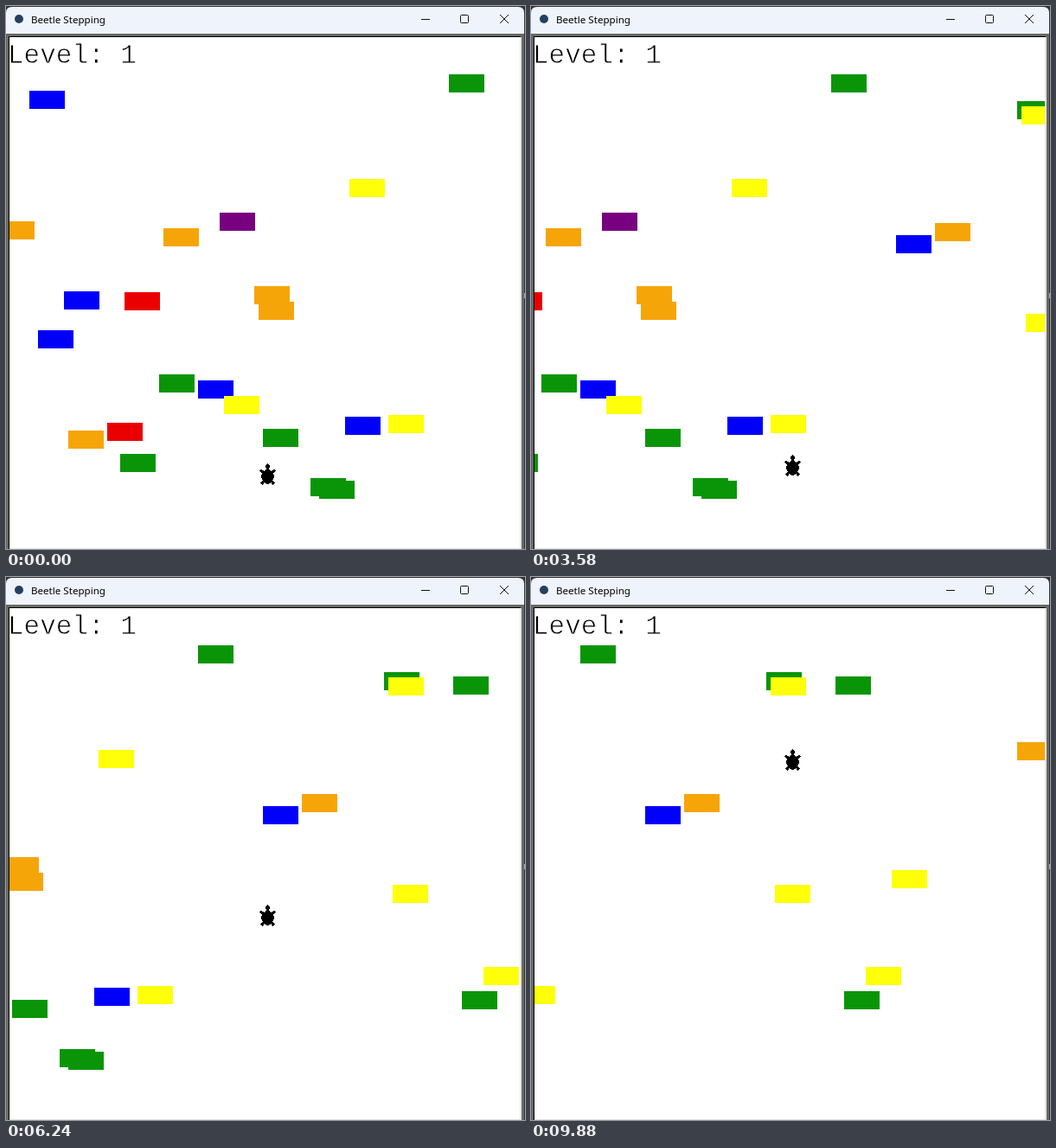
Write an HTML page that moves like this. It is 600 px wide and 628 px high and loops after 10000 ms.

```html
<!DOCTYPE html>
<html lang="en">
<head>
<meta charset="utf-8">
<title>Beetle Stepping</title>
<style>
  html, body { margin: 0; width: 100%; height: 100%; overflow: hidden; background: #fff; }
  svg { display: block; width: 600px; height: 628px; }
  .caption { font: 11.6px "Segoe UI", "Open Sans", "Noto Sans", sans-serif; }
  /* The white edge thins the strokes of the letters */
  .level { font: 31px "Courier New", "Liberation Mono", monospace; stroke: #fff; stroke-width: .8px; }
  .buttons { fill: none; stroke: #111; }
  .crisp { shape-rendering: crispEdges; }
  #cars rect { width: 41px; height: 21px; }
  .green { fill: #099507; }
  .blue { fill: #0000fa; }
  .orange { fill: #f6a509; }
  .red { fill: #eb0000; }
  .purple { fill: #780080; }
  .yellow { fill: #ffff0a; }
</style>
</head>
<body>
<svg viewBox="0 0 600 628">
  <defs>
    <clipPath id="field"><rect x="4" y="36" width="590" height="590"/></clipPath>
  </defs>

  <g class="crisp">
    <rect width="600" height="628" fill="#333"/>
    <rect x="599" y="332" width="1" height="6" fill="#aaa"/>
    <rect y="32" width="599" height="596" fill="#686866"/>
    <rect x="3" y="35" width="592" height="593"/>
    <rect x="4" y="36" width="592" height="592" fill="#e3e3e3"/>
    <rect x="4" y="36" width="590" height="591" fill="#fff"/>
  </g>
  <path d="M0 32V8Q0 1 7 1H592Q599 1 599 8V32Z" fill="#eff3fb"/>
  <circle cx="15" cy="15" r="5" fill="#24405f"/>
  <text class="caption" x="29" y="20">Beetle Stepping</text>
  <g class="buttons">
    <path d="M480 15.5H490"/>
    <rect x="525.5" y="10.5" width="9" height="9" rx="1"/>
    <path d="M571 10L581 20M581 10L571 20"/>
  </g>
  <text class="level" x="2" y="66">Level: 1</text>

  <g clip-path="url(#field)">
    <path id="turtle" class="crisp" stroke="#000" stroke-linejoin="round"
      d="M0-16L2-14 1-10 4-7 7-9 9-8 6-5 7-1 5 3 8 6 6 8 4 5 0 7-4 5-6 8-8 6-5 3-7-1-6-5-9-8-7-9-4-7-1-10-2-14Z"/>
    <g id="cars" class="crisp">
      <rect class="green" x="512" y="79"/>
      <rect class="blue" x="27" y="98"/>
      <rect class="yellow" x="397" y="200"/>
      <rect class="purple" x="247" y="239"/>
      <rect class="orange" x="-8" y="249"/>
      <rect class="orange" x="182" y="257"/>
      <rect class="orange" x="287" y="324"/>
      <rect class="blue" x="67" y="330"/>
      <rect class="red" x="137" y="331"/>
      <rect class="orange" x="292" y="342"/>
      <rect class="blue" x="37" y="375"/>
      <rect class="green" x="177" y="426"/>
      <rect class="blue" x="222" y="433"/>
      <rect class="yellow" x="252" y="451"/>
      <rect class="yellow" x="442" y="473"/>
      <rect class="blue" x="392" y="475"/>
      <rect class="red" x="117" y="482"/>
      <rect class="green" x="297" y="489"/>
      <rect class="orange" x="72" y="491"/>
      <rect class="green" x="132" y="518"/>
      <rect class="green" x="352" y="546"/>
      <rect class="green" x="362" y="549"/>
      <!-- Cars that drive in later -->
      <rect class="blue" x="587" y="265"/>
      <rect class="orange" x="632" y="251"/>
      <rect class="green" x="727" y="110"/>
      <rect class="yellow" x="732" y="116"/>
      <rect class="yellow" x="737" y="356"/>
      <rect class="green" x="807" y="115"/>
      <rect class="green" x="817" y="479"/>
      <rect class="yellow" x="842" y="451"/>
      <rect class="yellow" x="872" y="339"/>
      <rect class="orange" x="1017" y="191"/>
    </g>
  </g>
</svg>

<script>
const LOOP = 10000, TICK = 108.7, LEAD = 70, LAST_TICK = 91;
const STRIDE = 5, ENTRY = 577, HOP = 10;

const lane = document.getElementById("cars");
const turtle = document.getElementById("turtle");
const cars = [...lane.children].map(el => ({ el, x: +el.getAttribute("x") }));

const tickAt = time => Math.min(LAST_TICK, Math.floor((time + LEAD) / TICK));

// One early hop, a long wait, then a steady climb
function hopsAt(tick) {
  const climb = Math.max(0, Math.round((tick - 34.5) * 0.575));
  return tick < 7 ? 0 : 1 + climb;
}

function draw(time) {
  const tick = tickAt(time % LOOP);
  const shift = tick * STRIDE;
  lane.setAttribute("transform", `translate(${-shift})`);
  for (const { el, x } of cars) el.style.display = x - shift > ENTRY ? "none" : "";
  turtle.setAttribute("transform", `translate(302.5 ${545.5 - HOP * hopsAt(tick)})`);
}

const begin = performance.now();
function loop() {
  draw(performance.now() - begin);
  requestAnimationFrame(loop);
}
loop();
</script>
</body>
</html>
```
